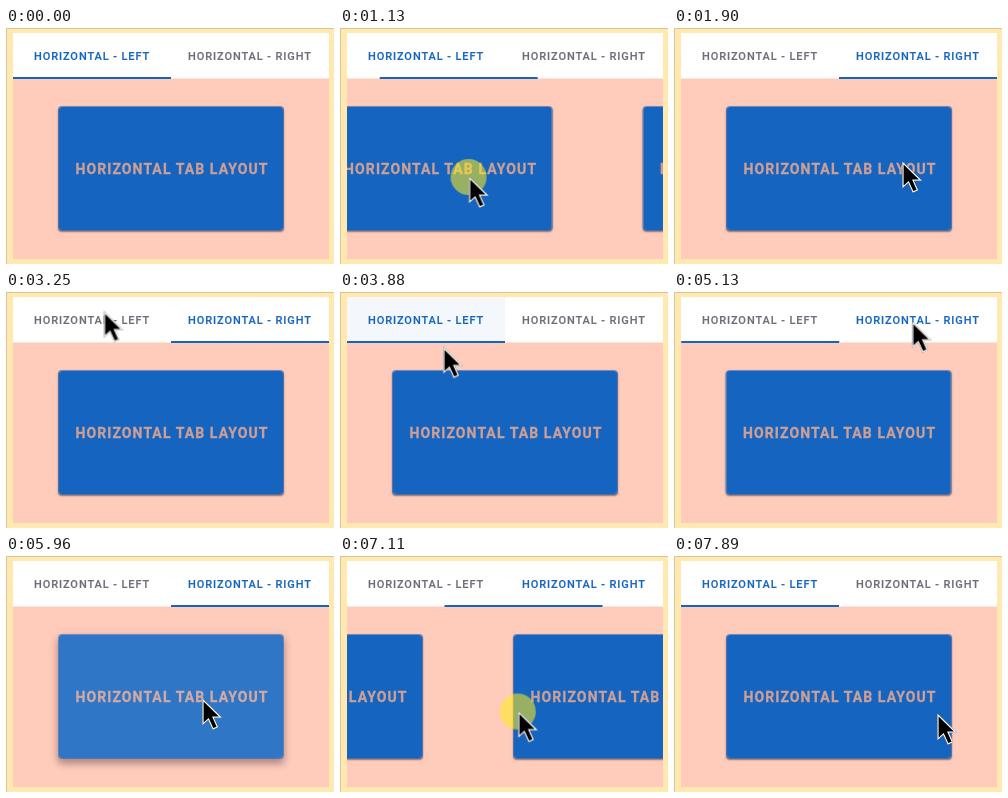
These frames come from a looping animation (328x236 px, 8 s). An HTML page:

```html
<!DOCTYPE html>
<html lang="en">
<head>
<meta charset="utf-8">
<title>Horizontal tab layout</title>
<style>
  @property --page { syntax: "<number>"; inherits: true; initial-value: 0; }

  :root { --blue: #1565c0; --grey: #6f6c78; --loop: 8s linear infinite; }

  html, body { margin: 0; width: 100%; height: 100%; overflow: hidden; }

  body {
    position: relative;
    background: #ffe9b0;
    box-shadow: inset 1px 1px #d9c592;
    font-family: Roboto, "Noto Sans", sans-serif;
  }

  .screen {
    position: absolute; left: 7px; top: 5px; width: 316px; height: 226px;
    overflow: hidden;
    background: #ffccbc;
    animation: page var(--loop);
  }

  /* Tab bar */
  .tabs {
    position: absolute; width: 316px; height: 45px;
    background: #fff; border-bottom: 1px solid #ffe3da;
  }

  .tab {
    position: absolute; width: 158px; height: 45px;
    box-sizing: border-box; padding-top: 1px;
    display: flex; align-items: center; justify-content: center;
    overflow: hidden; white-space: nowrap;
    font-size: 11px; font-weight: 500; letter-spacing: .92px;
    -webkit-text-stroke: .15px;
  }
  .tab.left { left: 0; animation: left-label var(--loop); animation-timing-function: step-end; }
  .tab.right { left: 158px; animation: right-label var(--loop); animation-timing-function: step-end; }

  .tab::after {
    content: ""; position: absolute; left: -21px; top: -77px;
    width: 200px; height: 200px; border-radius: 50%;
    background: var(--blue); opacity: 0;
  }
  .tab.left::after { animation: left-ripple var(--loop); }
  .tab.right::after { animation: right-ripple var(--loop); }

  .indicator {
    position: absolute; top: 44px; width: 158px; height: 2px;
    background: var(--blue);
    transform: translateX(calc(var(--page) * 158px));
  }

  /* Pages */
  .pages {
    position: absolute; top: 45px; width: 632px; height: 181px;
    transform: translateX(calc(var(--page) * -316px));
  }

  .card {
    position: absolute; left: 45px; top: 28px; width: 226px; height: 125px;
    box-sizing: border-box; padding: 1px 0 0 2px;
    display: flex; align-items: center; justify-content: center;
    overflow: hidden; white-space: nowrap;
    border: 1px solid rgba(21, 101, 192, .55); border-radius: 4px;
    background: var(--blue) padding-box; color: #ce9f95;
    font-size: 14px; font-weight: 700; letter-spacing: 1.1px;
    -webkit-text-stroke: .3px;
    animation: lift var(--loop);
  }
  .card + .card { left: 361px; }

  .card::before, .card::after { content: ""; position: absolute; background: #fff; }
  .card::before { inset: 0; animation: highlight var(--loop); }
  .card::after {
    left: -17px; top: -67.5px; width: 258px; height: 258px; border-radius: 50%;
    animation: card-ripple var(--loop);
  }

  /* Pointer */
  .pointer { position: absolute; left: -.8px; top: -.6px; animation: move var(--loop); }
  .pointer i {
    position: absolute; left: -19px; top: -19px; width: 36px; height: 36px;
    border-radius: 50%; background: rgba(255, 235, 30, .56);
    animation: press var(--loop);
  }
  .pointer svg {
    position: absolute; left: 0; top: 0; overflow: visible;
    filter: drop-shadow(0 0 .6px #000);
  }

  @keyframes page {
    0%, 11.6% { --page: 0; }
    16.875% { --page: .43; animation-timing-function: ease-out; }
    21%, 43.75% { --page: 1; animation-timing-function: ease-in-out; }
    48.5%, 64% { --page: 0; animation-timing-function: ease-in-out; }
    69.5%, 83.125% { --page: 1; animation-timing-function: linear; }
    88.875% { --page: .618; }
    92.5% { --page: .3465; animation-timing-function: ease-out; }
    96.6%, 100% { --page: 0; }
  }

  @keyframes left-label {
    0%, 44%, 92.75% { color: var(--blue); }
    16.875%, 62.5%, 100% { color: var(--grey); }
  }
  @keyframes right-label {
    0%, 44%, 92.75% { color: var(--grey); }
    16.875%, 62.5%, 100% { color: var(--blue); }
  }

  @keyframes left-ripple {
    0%, 42.4% { opacity: 0; transform: translate(24px, 7px) scale(0); }
    42.5% { opacity: .13; transform: translate(24px, 7px) scale(.1); }
    46% { opacity: .13; transform: none; }
    50%, 100% { opacity: 0; transform: none; }
  }
  @keyframes right-ripple {
    0%, 60.5% { opacity: 0; transform: translate(-4px, 3px) scale(0); }
    60.6% { opacity: .13; transform: translate(-4px, 3px) scale(.1); }
    62.2% { opacity: .13; transform: none; }
    63.6%, 100% { opacity: 0; transform: none; }
  }

  @keyframes lift {
    0%, 57%, 63.5%, 71.75%, 79%, 100% {
      box-shadow: 0 1px 2px rgba(60, 40, 50, .4), 0 1px 1px rgba(60, 40, 50, .2);
    }
    59.5%, 61%, 73.5%, 75% {
      box-shadow: 0 5px 7px rgba(60, 40, 50, .32), 0 2px 10px rgba(60, 40, 50, .16);
    }
  }

  @keyframes highlight {
    0%, 53.4%, 63.1%, 71.75%, 78.5%, 100% { opacity: 0; }
    55%, 58.5% { opacity: .15; }
    73% { opacity: .15; }
    74.5% { opacity: .11; }
  }

  @keyframes card-ripple {
    0%, 53.75% { opacity: .07; transform: translateX(-83px) scale(0); }
    57.375% { opacity: .07; transform: translateX(-28px) scale(.667); }
    59.5% { opacity: .07; transform: none; }
    63% { opacity: 0; transform: none; }
    63.1% { opacity: 0; transform: translate(33px, 4px) scale(0); }
    72% { opacity: .07; transform: translate(33px, 4px) scale(0); }
    74% { opacity: .01; transform: none; }
    76%, 100% { opacity: 0; transform: none; }
  }

  @keyframes move {
    0%, .8% { transform: translate(150px, 240px); animation-timing-function: ease-out; }
    9.5%, 11% { transform: translate(204px, 152px); }
    11.6% { transform: translate(196px, 152px); }
    16.875% { transform: translate(60px, 150px); animation-timing-function: ease-in-out; }
    23.5%, 24.5% { transform: translate(230px, 136px); animation-timing-function: ease-in-out; }
    31%, 32% { transform: translate(300px, 199px); animation-timing-function: ease-in-out; }
    36.625%, 40.7% { transform: translate(99.5px, 21.5px); }
    42%, 46.5% { transform: translate(111px, 35px); animation-timing-function: ease-in-out; }
    52.8%, 54.4% { transform: translate(82px, 140px); animation-timing-function: ease-in; }
    57.375% { transform: translate(188px, 67px); animation-timing-function: ease-out; }
    60.2%, 63.8% { transform: translate(240px, 31px); animation-timing-function: ease-in-out; }
    69.8%, 75% { transform: translate(198px, 145px); animation-timing-function: ease-in-out; }
    80.6%, 82% { transform: translate(48px, 157px); }
    83.125% { transform: translate(57.5px, 157px); }
    88.875% { transform: translate(179.5px, 157.5px); }
    92.5%, 100% { transform: translate(265px, 160px); }
  }

  @keyframes press {
    0%, 10.3%, 17.4%, 42.1%, 44%, 53.3%, 54.9%, 60.5%, 62.2%, 71.6%, 73.4%, 81%, 93%, 100% { opacity: 0; }
    10.6%, 16.9%, 42.4%, 43.5%, 53.5%, 54.5%, 60.8%, 61.8%, 71.9%, 73%, 81.2%, 92.5% { opacity: 1; }
  }
</style>
</head>
<body>
  <div class="screen">
    <div class="pages">
      <div class="card">HORIZONTAL TAB LAYOUT</div>
      <div class="card">HORIZONTAL TAB LAYOUT</div>
    </div>
    <div class="tabs">
      <div class="tab left">HORIZONTAL - LEFT</div>
      <div class="tab right">HORIZONTAL - RIGHT</div>
      <div class="indicator"></div>
    </div>
  </div>
  <div class="pointer">
    <i></i>
    <svg width="20" height="31">
      <path d="M0 0V24L5.5 18.9L10.1 28.9L14.4 27L10 17.2H17.6Z" stroke="#fff" stroke-width="1.2"/>
    </svg>
  </div>
</body>
</html>
```
